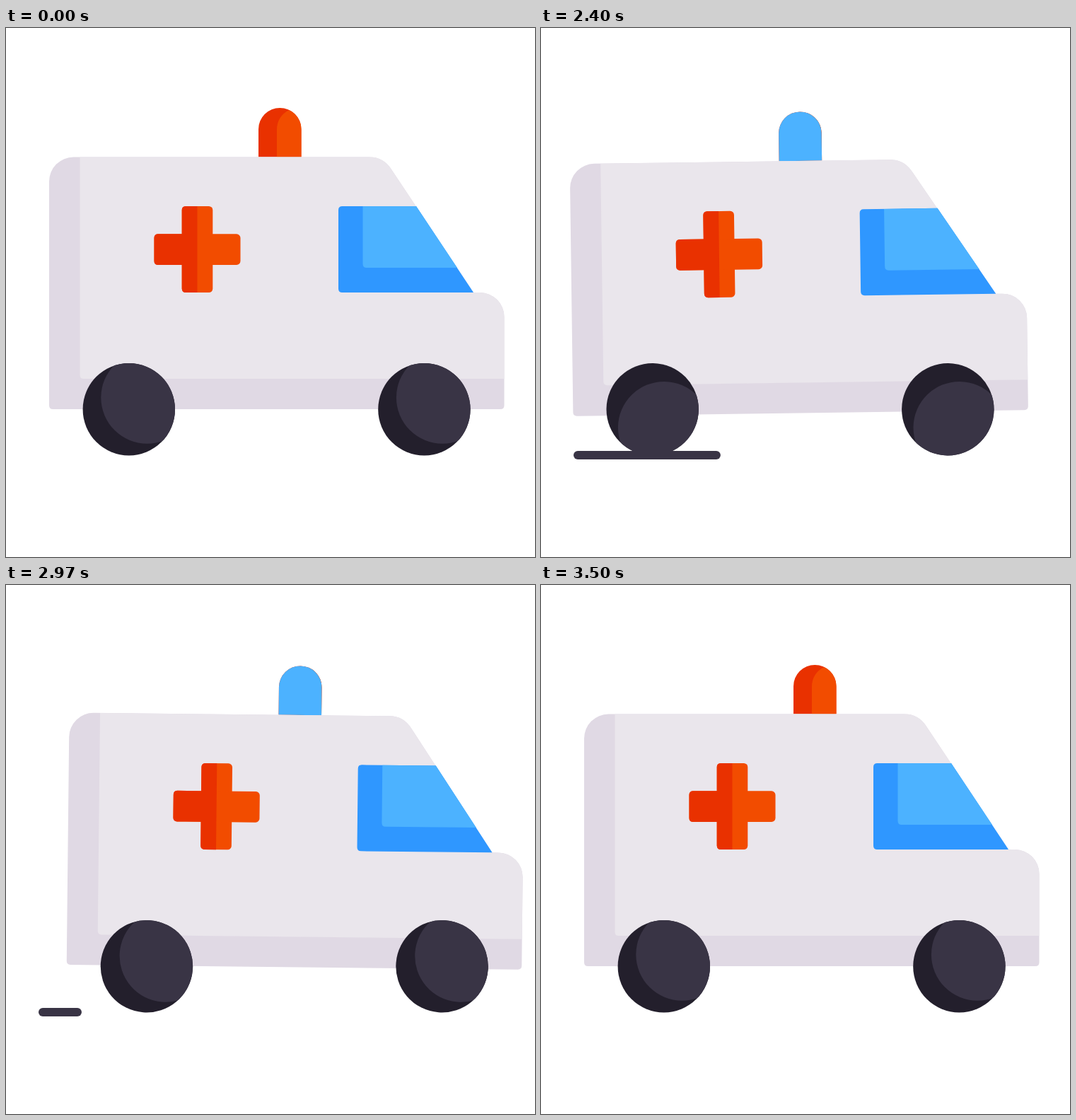
These frames come from a looping animation (748x748 px, 3.52 s). An HTML page:

```html
<!DOCTYPE html>
<html lang="en">
<head>
<meta charset="utf-8">
<title>Ambulance</title>
<style>
  html, body { margin: 0; width: 100%; height: 100%; overflow: hidden; background: #fff; }
  svg { display: block; width: 100vw; height: 100vh; }
</style>
</head>
<body>
<svg viewBox="0 0 748 748">
  <defs>
    <clipPath id="rim"><circle r="65.2"/></clipPath>
    <g id="wheel">
      <circle r="65.2" fill="#231f2c"/>
      <circle cx="25.7" cy="-16.7" r="65.2" fill="#393445" clip-path="url(#rim)"/>
    </g>
    <path id="lamp" d="M357 182.5V143.2a30.25 30.25 0 0 1 60.5 0V182.5Z"/>
  </defs>

  <g id="body">
    <use href="#lamp" fill="#e93100"/>
    <path fill="#f24c00" d="M383 182.5V143.2A30.25 30.25 0 0 1 400.3 115.9A30.25 30.25 0 0 1 417.5 143.2V182.5Z"/>
    <use id="flash" href="#lamp" fill="#4cb2ff"/>
    <path fill="#e0d9e4" d="M61 217A34.5 34.5 0 0 1 95.5 182.5H514Q534 182.5 545 200L661 374H670A34.5 34.5 0 0 1 704.5 408.5V533.5Q704.5 539 699 539H66.5Q61 539 61 533.5Z"/>
    <path fill="#eae6ec" d="M104.5 182.5H514Q534 182.5 545 200L661 374H670A34.5 34.5 0 0 1 704.5 408.5V496H110Q104.5 496 104.5 490.5Z"/>
    <path fill="#2f97ff" d="M475.5 252H580L661 374H475.5Q470 374 470 368.5V257.5Q470 252 475.5 252Z"/>
    <path fill="#4cb2ff" d="M504.5 252H580L638 339H510Q504.5 339 504.5 333.5Z"/>
    <g fill="#f24c00">
      <rect x="248.7" y="252" width="43.6" height="122" rx="5.5"/>
      <rect x="209.5" y="291.3" width="122" height="43.6" rx="5.5"/>
    </g>
    <path fill="#e93100" d="M270.5 252H254.2Q248.7 252 248.7 257.5V291.3H215Q209.5 291.3 209.5 296.8V329.4Q209.5 334.9 215 334.9H248.7V368.5Q248.7 374 254.2 374H270.5Z"/>
  </g>
  <use id="rear" href="#wheel"/>
  <use id="front" href="#wheel"/>
  <line id="road" y1="604" y2="604" stroke="#393445" stroke-width="12" stroke-linecap="round"/>
</svg>
<script>
const LOOP = 3520, HOLD = 2020, STEP = 25;
const $ = id => document.getElementById(id);
const [body, flash, rear, front, road] = ['body', 'flash', 'rear', 'front', 'road'].map($);

const smooth = p => p * p * (3 - 2 * p);

// Steeper ease-in-out, cubic-bezier(.6, 0, .4, 1)
function steep(p) {
  let lo = 0, hi = 1;
  for (let i = 0; i < 24; i++) {
    const t = (lo + hi) / 2, u = 1 - t;
    if (1.8 * t * u * u + 1.2 * t * t * u + t * t * t < p) lo = t; else hi = t;
  }
  return smooth(lo);
}

// Keys are [time, value]; the ride runs from 0 to 90
function track(keys, f, ease = smooth) {
  if (f <= keys[0][0]) return keys[0][1];
  for (let i = 1; i < keys.length; i++) {
    const [a, v] = keys[i - 1], [b, w] = keys[i];
    if (f <= b) return v + (w - v) * ease((f - a) / (b - a));
  }
  return keys[keys.length - 1][1];
}

const SHIFT = [[0, 0], [20, -17.3], [60, 25.3], [90, 0]];
const DIP = [[0, 0], [15, 8.8], [32, 2.7], [46, 0.2], [60, 1.4], [79, 1.6], [90, 0]];
const TILT = [[0, 0], [7.5, 0.6], [22, -0.9], [34, 0.91], [47, 0.2], [60, 0.63], [77, -0.54], [90, 0]];
const SPIN = [[4.5, 0], [54.7, 360], [90, 720]];
const GLOW = [[1.5, 0], [5, 1], [86, 1], [89, 0]];

function drawRoad(f) {
  const x0 = 705, len = 653;
  const head = 1.5 * len * (f % 30) / 30, tail = head - len / 2;
  const a = Math.max(0, tail), b = Math.min(len, head);
  road.setAttribute('x1', x0 - a);
  road.setAttribute('x2', x0 - b);
  road.setAttribute('visibility', b > a ? 'visible' : 'hidden');
}

function draw(ms) {
  const step = ms < HOLD ? 0 : Math.min(60, Math.floor((ms - HOLD) / STEP + 0.02) + 1);
  const f = step * 1.5;
  const x = track(SHIFT, f), spin = track(SPIN, f, steep);
  body.setAttribute('transform',
    `translate(${x} ${track(DIP, f)}) rotate(${track(TILT, f)} 383 500)`);
  rear.setAttribute('transform', `translate(${173.8 + x} 539.2) rotate(${spin})`);
  front.setAttribute('transform', `translate(${591.4 + x} 539.2) rotate(${spin})`);
  flash.setAttribute('opacity', track(GLOW, f));
  drawRoad(f);
}

const start = performance.now();
function tick() {
  draw((performance.now() - start) % LOOP);
  requestAnimationFrame(tick);
}
draw(0);
requestAnimationFrame(tick);
</script>
</body>
</html>
```
